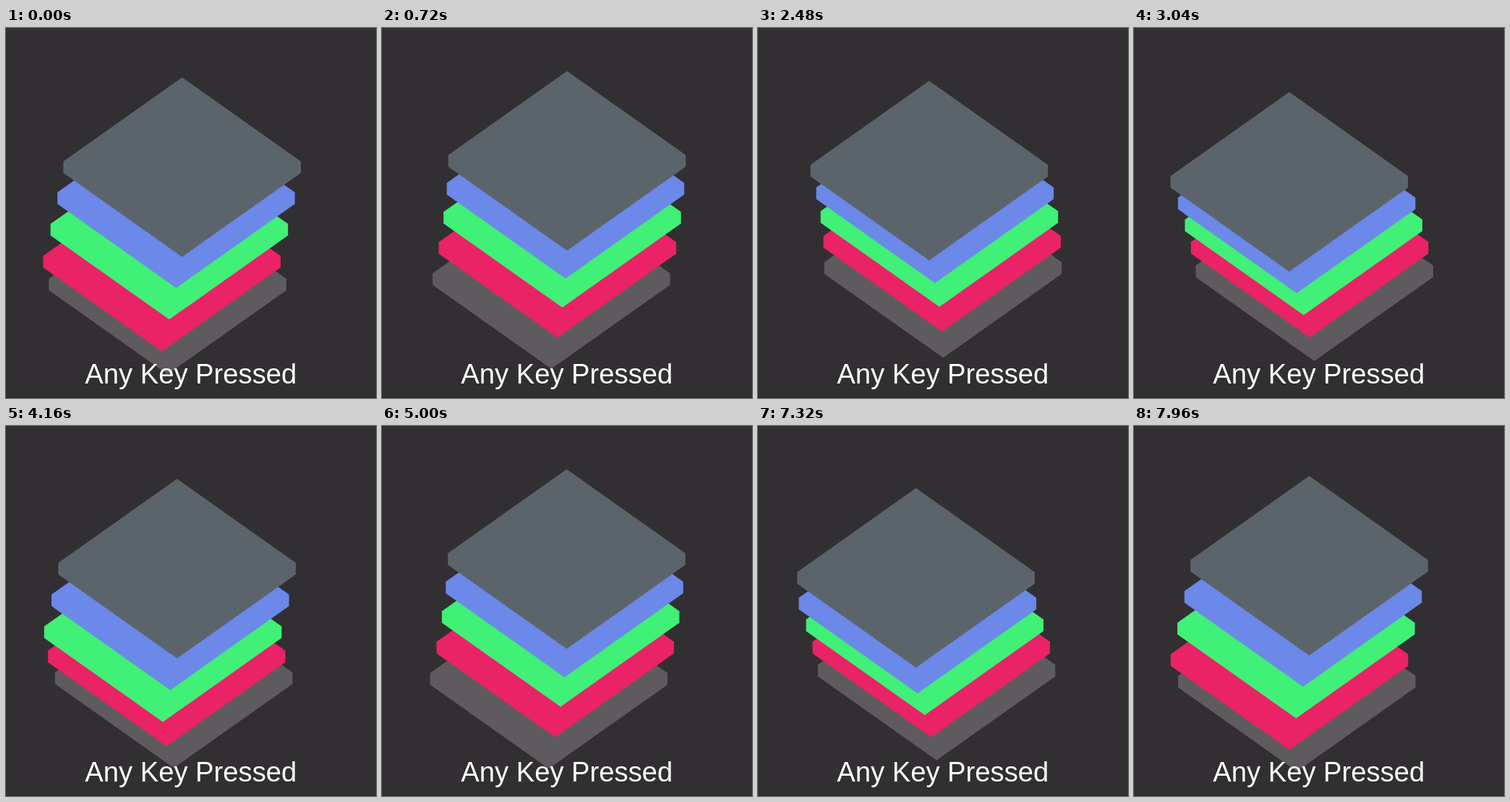
These frames come from a looping animation (512 by 511 pixels, 8 s). An HTML page:

```html
<!DOCTYPE html>
<html lang="en">
<head>
<meta charset="utf-8">
<title>Any Key Pressed</title>
<style>
  html, body { margin: 0; width: 100%; height: 100%; overflow: hidden; background: #322f32; }
  svg { display: block; width: 100%; height: 100%; }
  text { font: 38.2px "Liberation Sans", Arial, sans-serif; fill: #fff; }
</style>
</head>
<body>
<svg id="stage" viewBox="0 0 512 511">
  <rect width="512" height="511" fill="#322f32"/>
  <rect y="510" width="512" height="1" fill="#29272a"/>
  <g id="layers"></g>
  <text id="label" x="109.3" y="491">Any Key Pressed</text>
</svg>
<script>
  const LOOP = 8;
  const RAMP = 0.4;          // seconds to slow down or speed up
  const LABEL_LAG = 0.05;
  const START_PHASE = 0.777;
  const PHASE_STEP = 0.25;
  const PAUSES = [[1.093, 1.777], [3.075, 3.625], [5.1, 5.583]]; // key released, key pressed

  // Top layer first
  const COLORS = ['#5c646b', '#6c88e8', '#40f077', '#ea2266', '#5e5b5e'];
  const SLAB = '0,0 164.3,116 164.3,132 0,248 -164.3,132 -164.3,116';

  const group = document.getElementById('layers');
  const label = document.getElementById('label');

  const slabs = COLORS.map(color => {
    const slab = document.createElementNS('http://www.w3.org/2000/svg', 'polygon');
    slab.setAttribute('points', SLAB);
    slab.setAttribute('fill', color);
    group.prepend(slab);
    return slab;
  });

  // Distance covered while accelerating linearly to unit speed
  function travelled(t) {
    if (t <= 0) return 0;
    return t < RAMP ? t * t / (2 * RAMP) : t - RAMP / 2;
  }

  function phaseAt(t) {
    return PAUSES.reduce(
      (phase, [release, press]) => phase - travelled(t - release) + travelled(t - press),
      START_PHASE + t
    );
  }

  function isPressed(t) {
    return !PAUSES.some(([release, press]) =>
      t >= release + LABEL_LAG && t < press + LABEL_LAG);
  }

  function draw(t) {
    const phase = phaseAt(t);
    slabs.forEach((slab, i) => {
      const x = 214.5 + 41.6 * Math.abs(Math.sin(phase - i * PHASE_STEP));
      const y = 63 + 37 * i + (251 - x) * 0.702;
      slab.setAttribute('transform', `translate(${x.toFixed(2)} ${y.toFixed(2)})`);
    });
    label.setAttribute('visibility', isPressed(t) ? 'visible' : 'hidden');
  }

  const start = performance.now();
  function tick() {
    draw((performance.now() - start) / 1000 % LOOP);
    requestAnimationFrame(tick);
  }
  tick();
</script>
</body>
</html>
```
